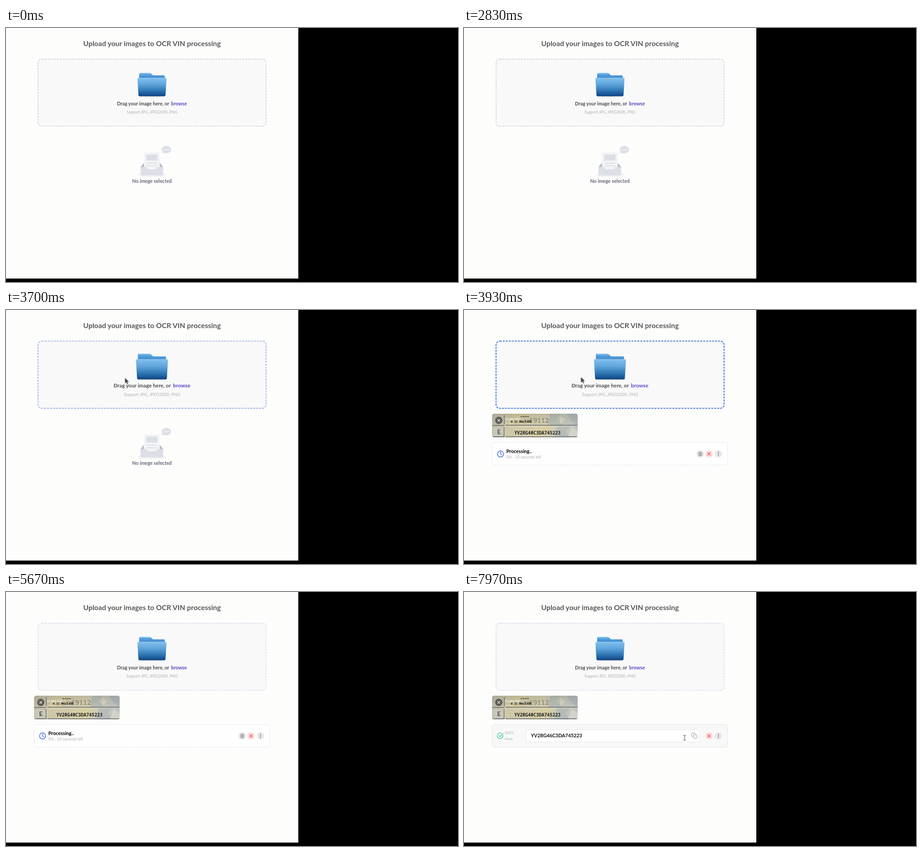
These frames come from a looping animation (998x561 px, 8000 ms). An HTML page:

```html
<!DOCTYPE html>
<html lang="en">
<head>
<meta charset="utf-8">
<title>Image upload</title>
<style>
  html, body { margin: 0; width: 100%; height: 100%; overflow: hidden; background: #000; }
  svg { display: block; width: 100vw; height: 100vh; font-family: Lato, sans-serif; }
  .bold { font-weight: 700; font-size: 10.67px; }
  .small { font-size: 8.6px; fill: #b0b0b4; }
  .mid { text-anchor: middle; }
  .mono { font-family: "Noto Sans Mono", monospace; }
  .line { fill: none; stroke-linecap: round; stroke-linejoin: round; }
</style>
</head>
<body>
<svg viewBox="0 0 998 561" xmlns="http://www.w3.org/2000/svg">
  <defs>
    <linearGradient id="front" x2="0" y2="1">
      <stop stop-color="#83c0ed"/><stop offset=".35" stop-color="#5fa6dc"/>
      <stop offset=".7" stop-color="#2f76b4"/><stop offset="1" stop-color="#0d4383"/>
    </linearGradient>
    <linearGradient id="back" x2="0" y2="1">
      <stop stop-color="#80c1f2"/><stop offset=".35" stop-color="#539ddd"/><stop offset="1" stop-color="#3f8acb"/>
    </linearGradient>
    <linearGradient id="plate">
      <stop stop-color="#bdbba6"/><stop offset=".2" stop-color="#cfc8a6"/>
      <stop offset=".6" stop-color="#d6cfae"/><stop offset="1" stop-color="#bcc2c0"/>
    </linearGradient>
    <linearGradient id="shade" x2="0" y2="1">
      <stop stop-color="#444" stop-opacity=".16"/><stop offset="1" stop-color="#444" stop-opacity="0"/>
    </linearGradient>
    <clipPath id="plateClip"><rect x="62" y="229" width="189" height="52.3" rx="4.5"/></clipPath>
  </defs>

  <rect width="998" height="561"/>
  <rect width="645.4" height="553.4" fill="#fdfdfc"/>
  <text class="mid" x="322.4" y="40.3" font-size="15.8" font-weight="700" fill="#58585a">Upload your images to OCR VIN processing</text>

  <rect id="zone" x="70.7" y="68.7" width="503.6" height="148.4" rx="8.5" stroke-dasharray="4.4 2.2"/>
  <g id="folder">
    <ellipse cx="322.3" cy="151" rx="30" ry="1.2" fill="#000" opacity=".12"/>
    <path d="M294 112V101q0-1.8 1.8-1.8h21.5q1.8 0 3 1.3l3.2 3.2q1 .8 2.4.8h22.8q1.8 0 1.8 1.8V112z" fill="url(#back)"/>
    <path d="M291.8 110.2h61.2q1.6 0 1.4 1.6l-2.2 36.5q-.2 2.4-2.4 2.4h-55q-2.2 0-2.4-2.4l-2.2-36.5q-.1-1.6 1.6-1.6z" fill="url(#front)"/>
    <path d="M292 110.8h60.8" stroke="#a4d2f3" stroke-width=".8"/>
  </g>
  <g id="prompt" class="bold">
    <text x="360.3" y="171" text-anchor="end" font-size="10.55" fill="#4d4d50">Drag your image here, or</text>
    <text x="364.6" y="171" fill="#5348c6">browse</text>
  </g>
  <text id="hint" class="small mid" x="322.4" y="189.2">Support JPG, JPEG2000, PNG</text>

  <g id="empty">
    <g transform="translate(279.7 260.2) scale(.461)">
      <ellipse cx="91.8" cy="138.6" rx="67.8" ry="12.7" fill="#f5f5f7"/>
      <path d="M146 101.3L122 72q-2-2.3-4.5-2.3H66q-2.5 0-4.5 2.3L37.6 101.3v15.4H146z" fill="#b3bac8"/>
      <rect x="53.8" y="31.7" width="76" height="101.3" rx="4" fill="#f3f4f6"/>
      <g fill="#dce0e6">
        <rect x="64.7" y="41.6" width="54.2" height="29" rx="2"/>
        <rect x="64.7" y="81.4" width="54.2" height="4.5" rx="2.2"/>
        <rect x="64.7" y="93.2" width="54.2" height="4.5" rx="2.2"/>
        <path d="M37.6 101.3h26.3q5.2 0 5.2 5.5 0 5.4 5.3 5.4h34.8q5.3 0 5.3-5.4 0-5.5 5.2-5.5H146V135q0 7-7 7H44.5q-7 0-7-7z"/>
        <ellipse cx="161.4" cy="18.1" rx="22.6" ry="18.1"/>
        <path d="M143 27l-2.500 9.200 11-3.600z"/>
      </g>
      <g fill="#fff"><circle cx="152.5" cy="18.5" r="2.8"/><circle cx="161.4" cy="18.5" r="2.8"/><circle cx="170.3" cy="18.5" r="2.8"/></g>
    </g>
    <text class="bold mid" x="322.2" y="341.7" fill="#66667c">No imege selected</text>
  </g>

  <g id="preview" clip-path="url(#plateClip)">
    <rect x="62" y="229" width="189" height="53" fill="url(#plate)"/>
    <path d="M112 229h32l-18 25H96zM160 256h34l-14 26h-38z" fill="#dccf98" opacity=".5"/>
    <path d="M190 229h24l-10 12 14 13h-32zM226 229h25v26l-14-11zM206 256h28l-10 12 12 14h-38z" fill="#a3b2b8" opacity=".5"/>
    <path d="M212 233l12 9-12 10zM238 258l13 10v14h-22z" fill="#e6e5d8" opacity=".5"/>
    <rect x="62" y="229" width="189" height="27" fill="url(#shade)"/>
    <rect x="64" y="259.5" width="24" height="20" rx="2" fill="#c9c7b8"/>
    <path class="line" d="M63 255h25M92 254.500h158M89 233v19M64 280h24.500V259M92 280h158" stroke="#62666f" stroke-width="1.4"/>
    <path class="line" d="M91 257h158M91 257v22" stroke="#e8e4d2" stroke-width=".8"/>
    <text class="mid" x="77" y="274.3" font-size="13" font-weight="700" fill="#4b4b4b">E</text>
    <g class="mono">
      <g font-size="14.6" font-weight="300" fill="#77766c"><text x="122" y="249">A</text><text x="144" y="249">19112</text></g>
      <g fill="#222" font-weight="600">
        <text x="103.5" y="249.2" font-size="6.2">0.31 Mer</text>
        <text x="133" y="249.4" font-size="8.6">540</text>
        <text x="111.3" y="275.2" font-size="10">YV2RG40C3DA745223</text>
      </g>
    </g>
    <path d="M125 235.500h18" stroke="#333" stroke-width="1.3" stroke-dasharray="3.5 1.3"/>
    <g fill="#fff"><text x="90" y="243" font-size="8.3">image.bmp</text><text x="90" y="252.5" font-size="6.5" opacity=".55">37 KB</text></g>
    <circle cx="76.8" cy="243.8" r="8" fill="#5c5c57"/>
    <path class="line" d="M74.300 241.300l5 5m0-5l-5 5" stroke="#fff" stroke-width="1.1"/>
  </g>

  <g id="row">
    <rect id="rowBox" x="62.3" y="292.6" width="520" height="50" rx="4.5" stroke-width=".8" stroke-dasharray="1.6 .9"/>
    <g id="busy">
      <g class="line" stroke="#3767d6" stroke-width="1.4"><circle cx="80.7" cy="318" r="6.7"/><path d="M80.700 314v4.200l2.600 1.400"/></g>
      <text class="bold" x="93.6" y="315.6">Processing..</text>
      <text class="small" x="93.6" y="328.3">0% - 10 seconds left</text>
      <circle cx="521.5" cy="318" r="8" fill="#e4e4e5"/>
      <path d="M518.600 314.200h2.100v7.600h-2.100zM522.400 314.200h2.100v7.600h-2.100z" fill="none" stroke="#777" stroke-width=".9"/>
    </g>
    <g id="done">
      <g class="line" stroke="#3fcf94" stroke-width="1.4"><path d="M86 316.500a6.300 6.300 0 1 1-2.700-4.300"/><path d="M77.500 317l2.400 2.400 6.300-6.300"/></g>
      <g class="small" style="font-size:8.4px"><text x="89.5" y="314">100%</text><text x="89.5" y="326.5">done</text></g>
      <rect x="137" y="304" width="383.7" height="27" rx="4" fill="#fff" stroke="#dfe1e8" stroke-width=".8"/>
      <text class="bold" x="147.7" y="321.4" fill="#111">YV2RG46C3DA745223</text>
      <g class="line" stroke="#8b8d98"><rect x="506.6" y="315.2" width="7.6" height="7.8" rx="1.4"/><path d="M504.700 319.200h-.5q-1.400 0-1.400-1.400v-4.900q0-1.400 1.400-1.400h5q1.400 0 1.400 1.400v.5"/></g>
    </g>
    <circle cx="541.1" cy="317.8" r="8" fill="#fcdedd"/>
    <path class="line" d="M538 314.700l6.200 6.200m0-6.200l-6.200 6.200" stroke="#df3f3f" stroke-width="1.2"/>
    <circle cx="561.7" cy="317.8" r="8" fill="#e8e8e9"/>
    <g fill="#555"><circle cx="561.7" cy="314.3" r="1"/><circle cx="561.7" cy="317.8" r="1"/><circle cx="561.7" cy="321.3" r="1"/></g>
  </g>

  <g id="pointer">
    <g id="arrow">
      <path d="M.8 1.200v13l3-2.500 2.200 4.300 2.200-1.100-2.100-4.100 4.100-.4z" fill="#000" opacity=".18"/>
      <path d="M0 0v12.300l2.900-2.500 2.200 4.300 2.100-1.100-2.100-4.100 3.900-.4z" fill="#444" stroke="#e9e9e9" stroke-width=".5" stroke-linejoin="round"/>
      <g id="plus"><circle cx="11.7" cy="12.5" r="4.3" fill="#22c234"/><path d="M9.700 12.500h4m-2-2v4" stroke="#fff" stroke-width="1.1"/></g>
    </g>
    <path id="beam" class="line" d="M-2.500-5.500q2 0 2.500 1 .5-1 2.500-1M0-4.500v9M-2.500 5.500q2 0 2.500-1 .5 1 2.500 1" stroke="#555" stroke-width="1.2"/>
  </g>
</svg>
<script>
const LOOP = 8000;
const ENTER = 3350, DROP = 3620, LISTED = 3750, LEAVE = 4200, DONE = 6250;
const el = Object.fromEntries([...document.querySelectorAll("[id]")].map(n => [n.id, n]));

// Pointer visits as [time, x, y] stops
const visits = [
  [[3200, 617, 257], [3330, 424, 208], [3400, 297.5, 171.5], [3520, 266, 151], [3930, 258, 148],
   [4200, 250, 150], [4530, 228.5, 154.5], [4700, 200, 185], [4960, 66, 305]],
  [[7400, 25, 357], [7500, 187, 345], [7600, 300, 334], [7720, 400, 327], [7860, 470, 322.5], [7970, 487, 322], [8000, 487, 322]]
];

const mix = (a, b, k) => a + (b - a) * k;
const ramp = (t, start, len) => {
  const k = Math.min(1, Math.max(0, (t - start) / len));
  return k * k * (3 - 2 * k);
};
const blend = (a, b, k) => `rgb(${a.map((v, i) => Math.round(mix(v, b[i], k)))})`;
const show = (node, on) => node.setAttribute("display", on ? "inline" : "none");
const grow = (node, cy, s) =>
  node.setAttribute("transform", `translate(322.4 ${cy}) scale(${s}) translate(-322.4 ${-cy})`);

function pointerAt(t) {
  const path = visits.find(v => t >= v[0][0] && t <= v[v.length - 1][0]);
  if (!path) return null;
  const i = Math.max(1, path.findIndex(p => p[0] >= t));
  const [t0, x0, y0] = path[i - 1], [t1, x1, y1] = path[i];
  const k = (t - t0) / (t1 - t0);
  return [mix(x0, x1, k), mix(y0, y1, k)];
}

function draw(t) {
  const hover = ramp(t, ENTER, 280) - ramp(t, LEAVE, 280);
  const scale = 1 + 0.1 * hover;
  grow(el.folder, 125, scale);
  grow(el.prompt, 167, scale);
  grow(el.hint, 186, scale);

  const over = t >= ENTER && t < DROP;
  const blue = ramp(t, DROP, 180) - ramp(t, LEAVE, 280);
  const rest = t < DROP ? [203, 203, 208] : [214, 216, 230];
  el.zone.setAttribute("fill", over ? "#d9e5fc" : "#f9f9fa");
  el.zone.setAttribute("stroke", blend(rest, [47, 100, 214], blue));
  el.zone.setAttribute("stroke-width", mix(1.4, 1.8, blue));

  const listed = t >= LISTED, done = t >= DONE;
  show(el.empty, !listed);
  show(el.preview, listed);
  show(el.row, listed);
  show(el.busy, !done);
  show(el.done, done);
  el.rowBox.setAttribute("fill", done ? "#f8f8f9" : "#fefefe");
  el.rowBox.setAttribute("stroke", done ? "#cfcfd4" : "#d3d6e8");

  const pos = pointerAt(t);
  show(el.pointer, pos);
  if (!pos) return;
  const [x, y] = pos;
  const typing = done && x > 137 && y < 331;
  el.pointer.setAttribute("transform", `translate(${x} ${y})`);
  show(el.arrow, !typing);
  show(el.beam, typing);
  show(el.plus, t < DROP);
}

const start = performance.now();
function tick() {
  draw((performance.now() - start) % LOOP);
  requestAnimationFrame(tick);
}
tick();
</script>
</body>
</html>
```
